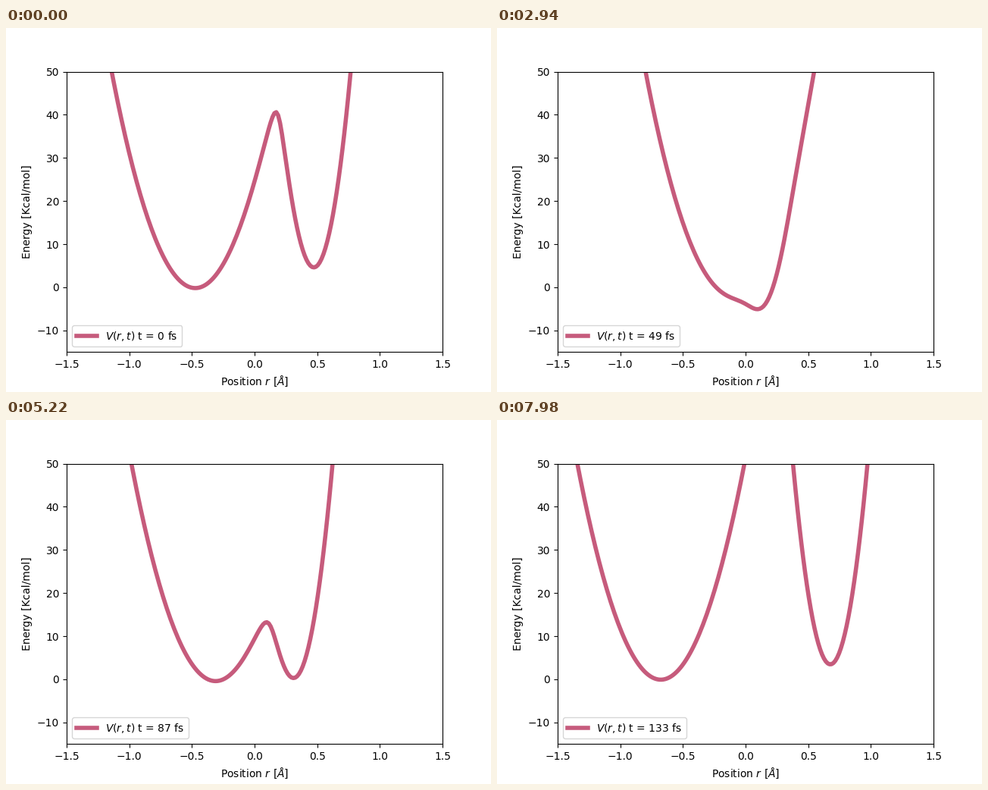
A matplotlib script that plays this animation: 640x480 px, repeating every 8 s.

```python
import numpy as np
import matplotlib.pyplot as plt
from matplotlib.animation import FuncAnimation

TICK = 20          # ms per drawn frame
HOLD = 3           # drawn frames per femtosecond
LOOP = 8000        # ms
K_LEFT, K_RIGHT = 113.0, 530.0   # well stiffness
COUPLING = 9.5

r = np.linspace(-1.5, 1.5, 200)


def half_distance(t):
    """Distance of each well from the middle, a slow oscillation."""
    return 0.41 - 0.28 * np.cos(2 * np.pi * (t - 51.7) / 180)


def right_offset(t):
    """Energy of the right well relative to the left one."""
    u = (t - 73) / 60
    return 2.2 + 1.95 * u**2 - 0.25 * u**3


def potential(t):
    """Lower adiabatic state of two coupled harmonic wells."""
    h = half_distance(t)
    left = K_LEFT * (r + h) ** 2
    right = K_RIGHT * (r - h) ** 2 + right_offset(t)
    return (left + right) / 2 - np.hypot((left - right) / 2, COUPLING)


def label(t):
    return f"$V(r,t)$ t = {t} fs"


fig, ax = plt.subplots(figsize=(6.4, 4.8), dpi=100)
line, = ax.plot(r, potential(0), color="#c65b7c", lw=4, label=label(0))
ax.set_xlim(-1.5, 1.5)
ax.set_ylim(-15, 50)
ax.set_xlabel(r"Position $r$ [$\AA$]")
ax.set_ylabel("Energy [Kcal/mol]")
legend = ax.legend(loc="best")
caption = legend.get_texts()[0]


def update(i):
    t = i // HOLD
    line.set_ydata(potential(t))
    caption.set_text(label(t))
    return line, caption


anim = FuncAnimation(fig, update, frames=LOOP // TICK, interval=TICK,
                     init_func=lambda: update(0), repeat=True, repeat_delay=0)
plt.show()
```
